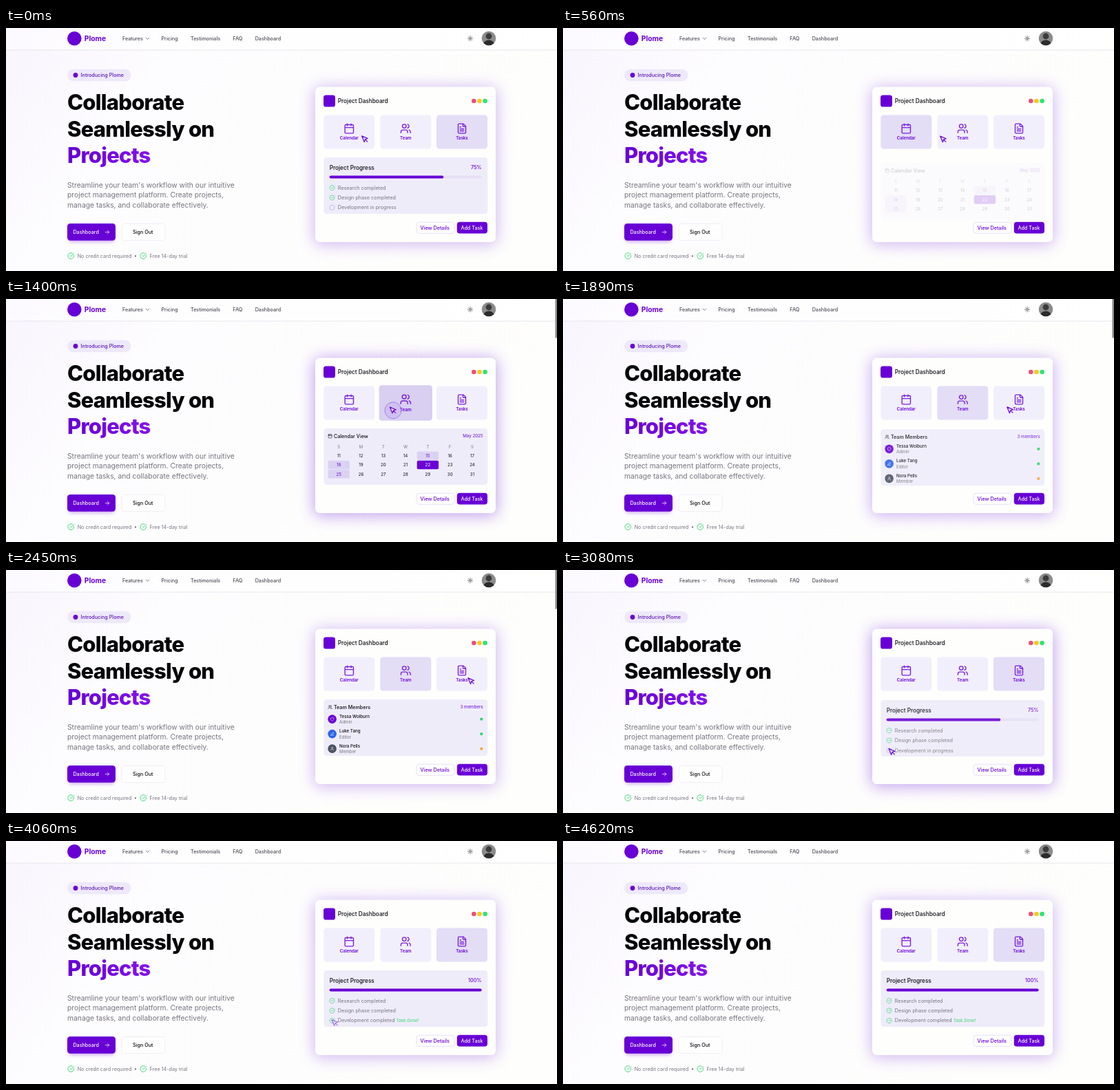
Animation, 800 px wide and 353 px high, one loop 4.69 s. Source, as an HTML page:

```html
<!DOCTYPE html>
<html lang="en">
<head>
<meta charset="utf-8">
<title>Plome</title>
<style>
html, body { margin: 0; width: 100%; height: 100%; overflow: hidden; background: #fefefd; }
svg { display: block; width: 800px; height: 353px; font-family: Inter, sans-serif; }
</style>
</head>
<body>
<svg id="stage" viewBox="0 0 800 353" xmlns="http://www.w3.org/2000/svg"></svg>
<script>
const LOOP = 4690, STEP = 70;
const PURPLE = '#6800d6', INK = '#0c0a12', GREY = '#77747f', GREEN = '#2fd86c';

// ---- markup helpers ----
const text = (x, y, s, size = 7.2, fill = INK, weight = 400, extra = '') =>
  `<text x="${x}" y="${y + size * 0.36}" font-size="${size}" fill="${fill}" font-weight="${weight}" ${extra}>${s}</text>`;
const rect = (x, y, w, h, r, fill, extra = '') =>
  `<rect x="${x}" y="${y}" width="${w}" height="${h}" rx="${r}" fill="${fill}" ${extra}/>`;
const dot = (x, y, r, fill, extra = '') => `<circle cx="${x}" cy="${y}" r="${r}" fill="${fill}" ${extra}/>`;
const icon = (x, y, size, d, color, width = 2) =>
  `<path transform="translate(${x - size / 2} ${y - size / 2}) scale(${size / 24})" d="${d}" fill="none" stroke="${color}" stroke-width="${width}" stroke-linecap="round" stroke-linejoin="round"/>`;
const END = 'text-anchor="end"', MID = 'text-anchor="middle"';

const ICONS = {
  calendar: 'M8 2v4M16 2v4M5 4h14a2 2 0 0 1 2 2v14a2 2 0 0 1-2 2H5a2 2 0 0 1-2-2V6a2 2 0 0 1 2-2zM3 10h18',
  users: 'M16 21v-2a4 4 0 0 0-4-4H6a4 4 0 0 0-4 4v2M13 7a4 4 0 1 1-8 0a4 4 0 1 1 8 0M22 21v-2a4 4 0 0 0-3-3.87M16 3.13a4 4 0 0 1 0 7.75',
  file: 'M15 2H6a2 2 0 0 0-2 2v16a2 2 0 0 0 2 2h12a2 2 0 0 0 2-2V7zM14 2v4a2 2 0 0 0 2 2h4M10 9H8M16 13H8M16 17H8',
  check: 'M21.8 10A10 10 0 1 1 17 3.34M9 11l3 3L22 4',
  ring: 'M22 12a10 10 0 1 1-20 0a10 10 0 1 1 20 0',
  arrow: 'M4 12h16M13 5l7 7-7 7',
  chevron: 'M5 9l7 7 7-7',
  sun: 'M16 12a4 4 0 1 1-8 0a4 4 0 1 1 8 0M12 2v2M12 20v2M5 5l1.4 1.4M17.6 17.6L19 19M2 12h2M20 12h2M6.4 17.6L5 19M19 5l-1.4 1.4',
  shield: 'M20 13c0 5-3.5 7.5-8 9c-4.500-1.500-8-4-8-9V6c3 0 6-2 8-4c2 2 5 4 8 4z',
  pencil: 'M4 20l1-5L17 3l4 4L9 19zM12 20h8',
  user: 'M19 21v-2a4 4 0 0 0-4-4H9a4 4 0 0 0-4 4v2M16 7a4 4 0 1 1-8 0a4 4 0 1 1 8 0',
  pointer: 'M3 3l7.070 16.970 2.510-7.390 7.390-2.510zM13 13l6 6'
};

const defs = () => `<defs>
  <linearGradient id="word" gradientUnits="userSpaceOnUse" x1="89" y1="0" x2="210" y2="0">
    <stop offset="0" stop-color="#6600d4"/><stop offset="1" stop-color="#8412ee"/></linearGradient>
  <linearGradient id="page" x1="0" y1="0" x2="1" y2=".3">
    <stop offset="0" stop-color="#f8f5fd"/><stop offset=".3" stop-color="#fdfcfe"/><stop offset="1" stop-color="#fefefc"/></linearGradient>
  <filter id="blur" x="-30%" y="-30%" width="160%" height="160%"><feGaussianBlur stdDeviation="11"/></filter>
  <filter id="soft" x="-30%" y="-60%" width="160%" height="220%"><feGaussianBlur stdDeviation="2.5"/></filter>
  <clipPath id="face"><circle cx="701" cy="15" r="10.3"/></clipPath>
</defs>`;

const header = () => rect(0, 0, 800, 32, 0, '#fff', 'opacity=".45"') + rect(0, 31.6, 800, 0.9, 0, '#e6e3ea')
  + dot(99.3, 15.2, 10.3, PURPLE) + text(113.8, 15.2, 'Plome', 10.3, PURPLE, 700)
  + [[169, 'Features'], [225.5, 'Pricing'], [268, 'Testimonials'], [329.3, 'FAQ'], [361.7, 'Dashboard']]
    .map(([x, s]) => text(x, 15.3, s, 7.2, '#4c4955', 500)).join('')
  + icon(205.500, 15.2, 8, ICONS.chevron, '#4c4955')
  + icon(674, 15.2, 8.6, ICONS.sun, '#222')
  + `<g clip-path="url(#face)">${rect(690, 4, 22, 22, 0, '#8b8b8b')}${dot(701, 12, 4.4, '#3b3b3b')}
     <ellipse cx="701" cy="24.500" rx="8" ry="7" fill="#2c2c2c"/></g>`;

const hero = () => rect(89, 59.8, 92.5, 17.4, 8.7, '#eee9fa') + dot(101, 68.5, 3.4, PURPLE)
  + text(108.6, 68.6, 'Introducing Plome', 7.2, '#5a14b4', 500)
  + ['Collaborate', 'Seamlessly on', 'Projects'].map((s, i) =>
    text(89, 108 + i * 38.6, s, 31, i == 2 ? 'url(#word)' : '#050507', 800, 'letter-spacing="-.775"')).join('')
  + ["Streamline your team's workflow with our intuitive", 'project management platform. Create projects,',
    'manage tasks, and collaborate effectively.'].map((s, i) => text(89, 228.2 + i * 14.4, s, 10.3, GREY)).join('')
  + rect(91, 289, 66, 22, 4, '#6800d6', 'opacity=".3" filter="url(#soft)"')
  + rect(89, 284, 70, 24.7, 4.2, PURPLE) + text(97.4, 296.500, 'Dashboard', 7.2, '#fff', 500)
  + icon(147, 296.5, 8.3, ICONS.arrow, '#fff')
  + rect(167.9, 284.3, 63, 24.3, 4.2, '#fefefe', 'stroke="#ece9f1" stroke-width=".7"')
  + text(184, 296.6, 'Sign Out', 7.2, INK, 500)
  + icon(94.3, 331, 10.6, ICONS.check, GREEN) + text(103.7, 331.2, 'No credit card required', 7.2, GREY)
  + dot(188, 331.3, 1.1, '#5d5a64')
  + icon(199.300, 331, 10.6, ICONS.check, GREEN) + text(208.600, 331.2, 'Free 14-day trial', 7.2, GREY);

const TILES = [[498.300, 'Calendar', ICONS.calendar], [580.3, 'Team', ICONS.users], [662, 'Tasks', ICONS.file]];

const card = () => rect(447, 86, 266, 229, 9, '#7a35dd', 'id="glow" filter="url(#blur)"')
  + rect(449, 85.5, 262, 225.4, 6.5, '#fefefd')
  + rect(461, 97.500, 17, 17, 3.6, PURPLE) + text(481.8, 106.1, 'Project Dashboard', 8.24, INK, 500)
  + dot(679.3, 106, 3.3, '#ee4f78') + dot(687.500, 106, 3.3, '#f9c81c') + dot(695.6, 106, 3.3, '#2ce573')
  + TILES.map(([x, s, d], i) => `<g id="tile${i}">${rect(x - 37, 126.4, 74, 49.2, 4.2, '#f2effc')}
    ${icon(x, 146, 16.5, d, '#7a1fe0')}${text(x, 160.200, s, 6.2, PURPLE, 600, MID)}</g>`).join('')
  + rect(596, 282.2, 55, 16.2, 4, '#fefefe', 'stroke="#e2daf5" stroke-width=".8"')
  + text(601.6, 290.4, 'View Details', 7.2, PURPLE, 500)
  + rect(654.8, 281.8, 44.2, 16.8, 4, PURPLE) + text(660.4, 290.4, 'Add Task', 7.2, '#fff', 500);

const panel = (id, body) => `<g id="${id}">${rect(461.4, 188, 237.8, 82, 4.2, '#efecfa')}${body}</g>`;

function calendar() {
  let s = icon(470.6, 199.1, 6.6, ICONS.calendar, INK) + text(475.9, 199.2, 'Calendar View', 7.2, INK, 500)
    + text(692.500, 199, 'May 2025', 6.2, PURPLE, 400, END);
  [...'SMTWTFS'].forEach((c, i) => s += text(483.2 + i * 32.3, 214.5, c, 5.9, GREY, 400, MID));
  for (let day = 11; day < 32; day++) {
    const x = 483.2 + (day - 11) % 7 * 32.3, y = 228 + Math.floor((day - 11) / 7) * 13.2;
    const today = day == 22, busy = [15, 18, 25].includes(day);
    if (today || busy) s += rect(x - 15.7, y - 6.4, 31.4, 12.5, 2, today ? PURPLE : '#dbd2f3');
    s += text(x, y, day, 6.2, today ? '#fff' : busy ? PURPLE : INK, 400, MID);
  }
  return s;
}

const team = () => icon(470.6, 199.1, 6.6, ICONS.users, INK) + text(475.9, 199.2, 'Team Members', 7.2, INK, 500)
  + text(692.5, 199, '3 members', 6.2, PURPLE, 400, END)
  + [['Tessa Wolburn', 'Admin', PURPLE, ICONS.shield, GREEN], ['Luke Tang', 'Editor', '#2b62ea', ICONS.pencil, GREEN],
    ['Nora Pells', 'Member', '#4a5262', ICONS.user, '#f5a83a']].map(([name, role, color, d, status], i) => {
    const y = 216.6 + i * 21.500;
    return dot(473.6, y, 6.3, color) + icon(473.6, y, 6.2, d, '#fff') + text(484, y - 4.2, name, 6.2, INK, 500)
      + text(484, y + 4.4, role, 6.2, GREY) + dot(690.3, y, 2.2, status);
  }).join('');

const tasks = () => text(469.7, 202.6, 'Project Progress', 8.24, INK, 500)
  + text(690.5, 202.4, '', 7.2, PURPLE, 500, END + ' id="percent"')
  + rect(469.600, 214.4, 221, 4.1, 2, '#e6e0f6') + rect(469.6, 214.4, 165.7, 4.1, 2, PURPLE, 'id="bar"')
  + ['Research completed', 'Design phase completed'].map((s, i) =>
    icon(473.6, 232 + i * 14.4, 8.6, ICONS.check, GREEN) + text(481.8, 232 + i * 14.4, s, 7.2, GREY)).join('')
  + `<g id="open">${icon(473.6, 260.9, 8.6, ICONS.ring, '#b9a6e4')}</g><g id="done">${icon(473.6, 260.9, 8.6, ICONS.check, GREEN)}</g>`
  + text(481.8, 260.9, '', 7.2, GREY, 400, 'id="last"')
  + text(566.500, 261.2, 'Task Done!', 6.2, GREEN, 400, 'font-style="italic" id="note"');

const stage = document.getElementById('stage');
stage.innerHTML = defs() + rect(0, 0, 800, 353, 0, 'url(#page)') + header() + hero() + card()
  + panel('calendar', calendar()) + panel('team', team()) + panel('tasks', tasks())
  + `<g id="cursor"><circle id="click" fill="#7a35dd" fill-opacity=".12" stroke="#9a63e6" stroke-width=".9"/>
     ${icon(0, 0, 12.4, ICONS.pointer, PURPLE, 2.3).replace('fill="none"', 'fill="#e6dcfa"')}</g>`
  + rect(797.4, 0, 2.6, 56.5, 0, '#8c8c8c', 'id="scroll"');

// ---- timing ----
const el = id => document.getElementById(id);
const set = (id, attrs) => { for (const k in attrs) el(id).setAttribute(k, attrs[k]); };
const ramp = (t, a, b) => Math.min(1, Math.max(0, (t - a) / (b - a)));
const out = u => 1 - (1 - u) ** 2;
const smooth = u => u * u * (3 - 2 * u);
const bump = (t, c, w) => Math.exp(-(((t - c) / w) ** 2));
const mix = (a, b, u) => a + (b - a) * u;
const blend = (a, b, u) => `rgb(${a.map((v, i) => Math.round(mix(v, b[i], u)))})`;

const TABS = [230, 1395, 2580];
const CLICKS = [110, 1190, 2460, 3430];
const MOVES = [[330, 780, 562, 161.8], [1640, 2120, 675.5, 161.5], [2660, 3060, 477.7, 264.3]];
const PLAIN = [242, 239, 252], ACTIVE = [227, 221, 246], HOVER = [216, 207, 241];
const SWAP = 300;

function pose(id, enter, leave, t) {
  const a = enter === null ? 1 : out(ramp(t, enter, enter + SWAP));
  const b = leave === null ? 0 : ramp(t, leave, leave + SWAP);
  set(id, { opacity: a * (1 - b), transform: `translate(0 ${10 * (1 - a) - 10 * smooth(b)})` });
}

function draw(t) {
  pose('calendar', TABS[0] + SWAP, TABS[1], t);
  pose('team', TABS[1] + SWAP, TABS[2], t);
  if (t < 1500) pose('tasks', null, TABS[0], t);
  else pose('tasks', TABS[2] + SWAP, null, t);

  TILES.forEach(([x], i) => {
    const on = ramp(t, TABS[i], TABS[i] + 100), off = ramp(t, TABS[(i + 1) % 3] - 60, TABS[(i + 1) % 3]);
    const active = i == 2 ? Math.max(1 - ramp(t, TABS[0] - 60, TABS[0]), on) : on * (1 - off);
    const c = CLICKS[i], lift = smooth(ramp(t, c, c + 110)) * (1 - smooth(ramp(t, c + 270, c + 390)));
    const base = PLAIN.map((v, k) => mix(v, ACTIVE[k], active));
    el('tile' + i).firstElementChild.setAttribute('fill', blend(base, HOVER, lift));
    set('tile' + i, { transform: `translate(${x} 151) scale(${1 + 0.045 * lift}) translate(${-x} -151)` });
  });

  const full = t < 1500 || t < 3540 ? 0 : 1, finished = t >= 3640;
  el('percent').textContent = full ? '100%' : '75%';
  set('bar', { width: mix(165.7, 221, smooth(ramp(t, 3570, 4050))) });
  el('last').textContent = finished ? 'Development completed' : 'Development in progress';
  set('open', { opacity: finished ? 0 : 1 });
  set('done', { opacity: finished ? 1 : 0 });
  set('note', { opacity: ramp(t, 3700, 3980) });

  let x = 521.2, y = 161.5;
  for (const [a, b, nx, ny] of MOVES) {
    const u = out(ramp(t, a, b));
    x = mix(x, nx, u);
    y = mix(y, ny, u);
  }
  set('cursor', { transform: `translate(${x} ${y})`, opacity: 1 - ramp(t, 3920, 4200) });
  const start = CLICKS.find(c => t >= c && t < c + 350);
  const u = start === undefined ? 1 : (t - start) / 350;
  set('click', { r: 20 * u, opacity: Math.min(1, 2 * (1 - u)) });

  set('glow', { opacity: 0.34 + 0.12 * (bump(t, 1400, 450) + bump(t, 3200, 420)) });
  set('scroll', { opacity: ramp(t, 1150, 1290) * (1 - ramp(t, 2520, 2800)) });
}

function tick() {
  draw(Math.floor(performance.now() % LOOP / STEP) * STEP);
  requestAnimationFrame(tick);
}
tick();
</script>
</body>
</html>
```
